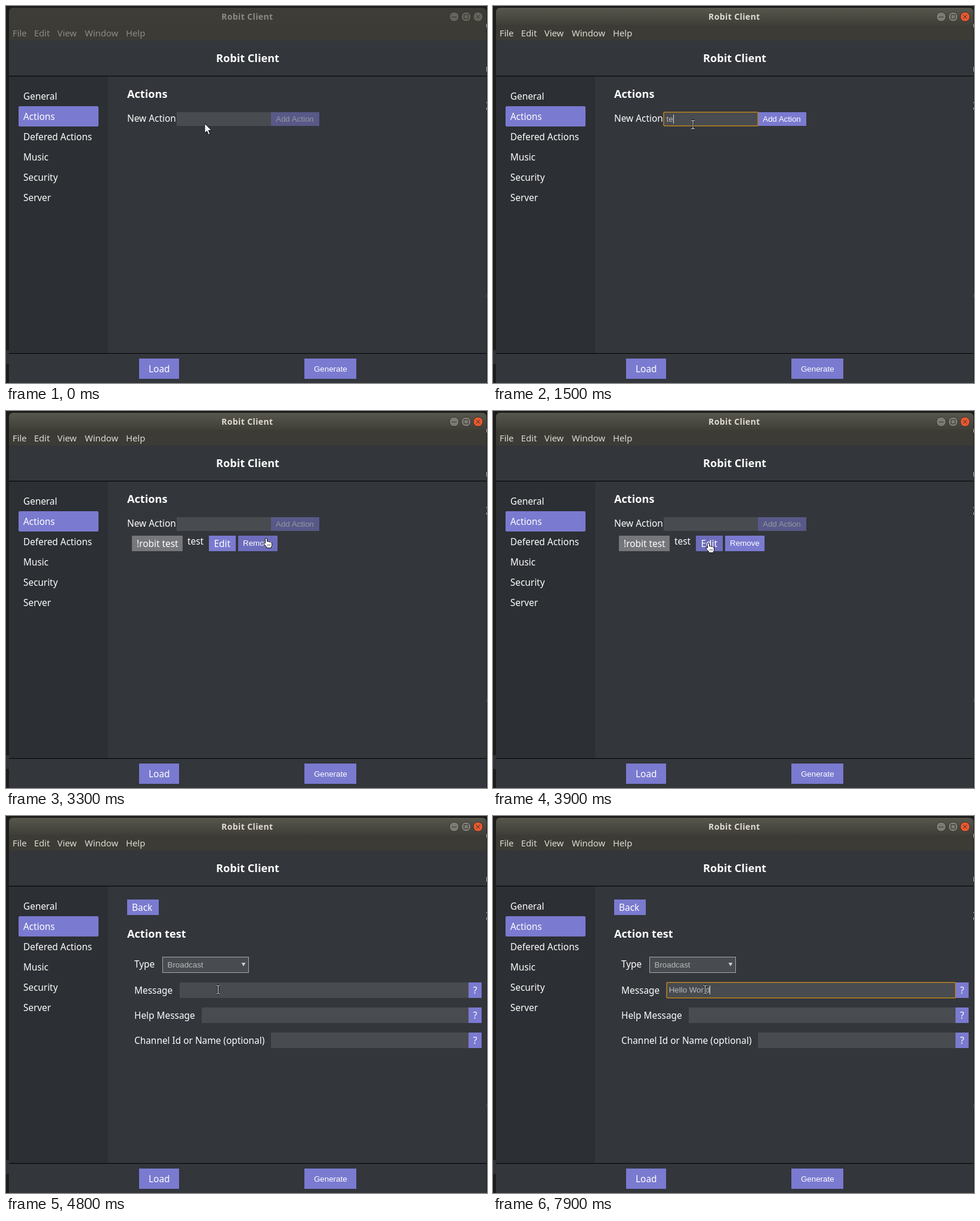
Animation, 806 px wide and 632 px high, one loop 8 s. Source, as an HTML page:

```html
<!DOCTYPE html>
<html lang="en">
<head>
<meta charset="utf-8">
<title>Robit Client</title>
<style>
  html, body { margin: 0; width: 100%; height: 100%; overflow: hidden; background: #1c1d1b; }
  svg { display: block; width: 806px; height: 632px; }
  text { font: 15.4px "Noto Sans", sans-serif; fill: #fff; white-space: pre; }
  .small { font: 13.333px "Liberation Sans", Arial, sans-serif; }
  .value { fill: #b9babc; }
  .head { font-size: 18.15px; font-weight: 700; }
  .title { font-size: 14px; font-weight: 700; letter-spacing: .4px; }
  .bar text { font-size: 14.8px; fill: #dfdbd2; }
  .bar .title { font-size: 14px; }
  .bar.idle text { fill: #8c8a83; }
  .bar .top { fill: url(#lit); }
  .bar.idle .top { fill: #3d3c36; }
  .bar .knob { fill: #7c7a72; stroke: #34332e; }
  .bar .close { fill: #e8582f; }
  .bar.idle .knob { fill: #65635b; }
  .glyph { fill: none; stroke: #34332e; }
  .btn { fill: #7a7ad0; }
  .hover .btn { fill: #6d6dbc; }
  .off .btn { fill: #585988; }
  .off text { fill: #97979f; }
  .field { fill: #484b4f; }
  .ring { fill: none; stroke: #b98422; stroke-width: 1.5; }
  .caret { fill: #d8d8d8; }
</style>
</head>
<body>
<svg viewBox="0 0 806 632">
  <defs>
    <linearGradient id="lit" x2="0" y2="1">
      <stop offset="0" stop-color="#58574e"/>
      <stop offset="1" stop-color="#3e3d36"/>
    </linearGradient>
  </defs>
  <rect width="806" height="632" fill="#1c1d1b"/>
  <rect y="577" width="5" height="23" fill="#303236"/>
  <path d="M805.5 30v6M805.5 102v8M805.5 161v2M805.5 170v4" stroke="#aaa"/>
  <path d="M805.5 483v5" stroke="#444"/>

  <g id="bar" class="bar">
    <path class="top" d="M5 33V10q0-7 7-7h786q7 0 7 7v23z"/>
    <rect x="5" y="32" width="800" height="26" fill="#3c3b35"/>
    <text class="title" x="361" y="23">Robit Client</text>
    <circle class="knob" cx="751" cy="18" r="8"/>
    <circle class="knob" cx="771" cy="18" r="8"/>
    <circle class="knob close" cx="791" cy="18" r="8"/>
    <path class="glyph" d="M747 18.5h8M767.5 14.5h7v7h-7zM788 15l6 6M794 15l-6 6"/>
    <text x="11" y="51">File</text>
    <text x="47" y="51">Edit</text>
    <text x="86" y="51">View</text>
    <text x="132" y="51">Window</text>
    <text x="201" y="51">Help</text>
  </g>

  <rect x="5" y="58" width="800" height="574" fill="#33363b"/>
  <rect x="5" y="118" width="166" height="464" fill="#2c2f33"/>
  <path d="M5 117.5h800M5 582.5h800" stroke="#000"/>
  <text class="head" x="352" y="94">Robit Client</text>
  <rect class="btn" x="21" y="168" width="134" height="34" rx="2"/>
  <g id="menu"></g>
  <rect class="btn" x="223" y="591" width="67" height="34"/>
  <text x="239" y="614">Load</text>
  <rect class="btn" x="500" y="591" width="87" height="34"/>
  <text class="small" x="516" y="613">Generate</text>

  <g id="list">
    <text class="head" x="203" y="154">Actions</text>
    <text x="203" y="194">New Action</text>
    <rect class="field" x="286" y="178" width="158" height="23"/>
    <g id="add">
      <rect class="btn" x="444" y="178" width="81" height="23"/>
      <text class="small" x="452" y="194">Add Action</text>
    </g>
    <rect id="nameRing" class="ring" x="286" y="178" width="158" height="23" rx="1.5"/>
    <text id="name" class="small value" x="290.5" y="194"></text>
    <rect id="nameCaret" class="caret" y="182" width="1" height="15"/>
    <g id="row">
      <rect x="211" y="209" width="85" height="26" fill="#75777a"/>
      <text x="219" y="228" font-style="italic">!robit test</text>
      <text x="304" y="224">test</text>
      <g id="edit">
        <rect class="btn" x="340" y="209" width="45" height="26"/>
        <text x="348.5" y="228">Edit</text>
      </g>
      <g id="remove">
        <rect class="btn" x="389" y="209" width="66" height="26"/>
        <text class="small" x="397" y="226">Remove</text>
      </g>
    </g>
  </g>

  <g id="form">
    <rect class="btn" x="203" y="140" width="53" height="26"/>
    <text x="211" y="159" font-weight="700">Back</text>
    <text class="head" x="203" y="204">Action test</text>
    <text x="215" y="254">Type</text>
    <rect class="field" x="262.5" y="236.5" width="144" height="26" stroke="#a9a9a9"/>
    <text class="small value" x="270.5" y="254">Broadcast</text>
    <path d="M394.500 246h7l-3.500 6z" fill="#ccc"/>
    <g id="inputs"></g>
    <rect id="msgRing" class="ring" x="291" y="279" width="484" height="26" rx="1.5"/>
    <text id="msg" class="small value" x="294.700" y="296"></text>
    <rect id="msgCaret" class="caret" y="284" width="1" height="15"/>
  </g>

  <g id="arrow">
    <path d="M0 0v16l3.700-3.400 2.600 5.900 2.600-1.100-2.600-5.800h5z" fill="#fff" stroke="#111"/>
  </g>
  <g id="beam" fill="none">
    <path d="M-3 -7h2l1 1 1-1h2M0-6V6M-3 7h2l1-1 1 1h2" stroke="#111" stroke-width="3"/>
    <path d="M-3 -7h2l1 1 1-1h2M0-6V6M-3 7h2l1-1 1 1h2" stroke="#fff"/>
  </g>
  <g id="hand">
    <path d="M-1.500 0q1.500-1.500 3 0v5l2-.5 1 1 2-.3 1 1 2 .3v5l-1 2v2h-8v-2l-4.500-4.500v-2h2l.5 1z"
          fill="#fff" stroke="#111"/>
    <path d="M2.500 9v3M4.500 9v3M6.500 9v3" stroke="#555" stroke-width=".8"/>
  </g>
</svg>
<script>
const LOOP = 8000;
const $ = id => document.getElementById(id);

$('menu').innerHTML = ['General', 'Actions', 'Defered Actions', 'Music', 'Security', 'Server']
  .map((label, i) => `<text x="29" y="${157 + 34 * i}">${label}</text>`).join('');

$('inputs').innerHTML = [['Message', 291], ['Help Message', 328], ['Channel Id or Name (optional)', 444]]
  .map(([label, x], i) => {
    const y = 279 + 42 * i;
    return `<text x="215" y="${y + 19}">${label}</text>
      <rect class="field" x="${x}" y="${y}" width="${775 - x}" height="26"/>
      <rect class="btn" x="775" y="${y}" width="22" height="26"/>
      <text x="786" y="${y + 19}" text-anchor="middle">?</text>`;
  }).join('');

// Each step: start time, then the value held until the next step.
const nameSteps = [[0, ''], [1500, 'te'], [1600, 'test'], [3100, '']];
const nameCaretSteps = [[0, false], [500, true], [1000, false], [1500, true], [2200, false], [2700, true], [3100, false]];
const msgSteps = [[0, ''], [5700, 'H'], [5800, 'He'], [6000, 'Hel'], [6100, 'Hell'], [6600, 'Hello'],
  [6800, 'Hello '], [7100, 'Hello W'], [7200, 'Hello Wo'], [7600, 'Hello Worl'], [7900, 'Hello World']];
const msgCaretSteps = [[0, false], [5300, true], [5500, false], [5700, true]];
const pointerSteps = [
  [0, 'arrow', 333, 197], [400, 'beam', 335, 199],
  [2200, 'beam', 338, 200], [2300, 'arrow', 347, 203], [2400, 'arrow', 375, 204], [2500, 'arrow', 408, 204],
  [2600, 'arrow', 440, 203], [2700, 'hand', 466, 196], [2800, 'hand', 485, 190], [2900, 'hand', 492, 188],
  [3200, 'arrow', 470, 201], [3300, 'hand', 436, 214],
  [3500, 'hand', 425, 220], [3600, 'arrow', 390, 243], [3700, 'arrow', 324, 242], [3800, 'hand', 346, 229],
  [3900, 'hand', 361, 222],
  [4300, 'arrow', 361, 222], [4400, 'arrow', 361, 228], [4500, 'arrow', 358, 246], [4600, 'arrow', 355, 267],
  [4700, 'beam', 355.5, 286], [4800, 'beam', 355.5, 291]
];

const stepAt = (steps, t) => steps.findLast(step => step[0] <= t).slice(1);
const within = (t, from, to) => t >= from && t < to;
const show = (id, on) => $(id).style.display = on ? '' : 'none';

function drawEntry(id, steps, caretSteps, t) {
  const text = $(id);
  const [value] = stepAt(steps, t);
  if (text.textContent !== value) text.textContent = value;
  const [caret] = stepAt(caretSteps, t);
  const width = value ? text.getComputedTextLength() : 0;
  $(id + 'Caret').setAttribute('x', Math.round(+text.getAttribute('x') + width));
  show(id + 'Caret', caret);
}

function draw(t) {
  $('bar').classList.toggle('idle', t < 400);
  show('list', t < 4300);
  show('form', t >= 4300);
  show('row', t >= 3100);
  show('nameRing', within(t, 500, 3100));
  show('msgRing', t >= 5300);

  $('add').classList.toggle('off', !within(t, 1500, 3100));
  $('add').classList.toggle('hover', within(t, 2700, 3100));
  $('remove').classList.toggle('hover', within(t, 3300, 3600));
  $('edit').classList.toggle('hover', within(t, 3800, 4300));

  drawEntry('name', nameSteps, nameCaretSteps, t);
  drawEntry('msg', msgSteps, msgCaretSteps, t);

  const [shape, x, y] = stepAt(pointerSteps, t);
  for (const id of ['arrow', 'beam', 'hand']) show(id, id === shape);
  $(shape).setAttribute('transform', `translate(${x} ${y})`);
}

const start = performance.now();
function tick() {
  draw((performance.now() - start) % LOOP);
  requestAnimationFrame(tick);
}
tick();
</script>
</body>
</html>
```
